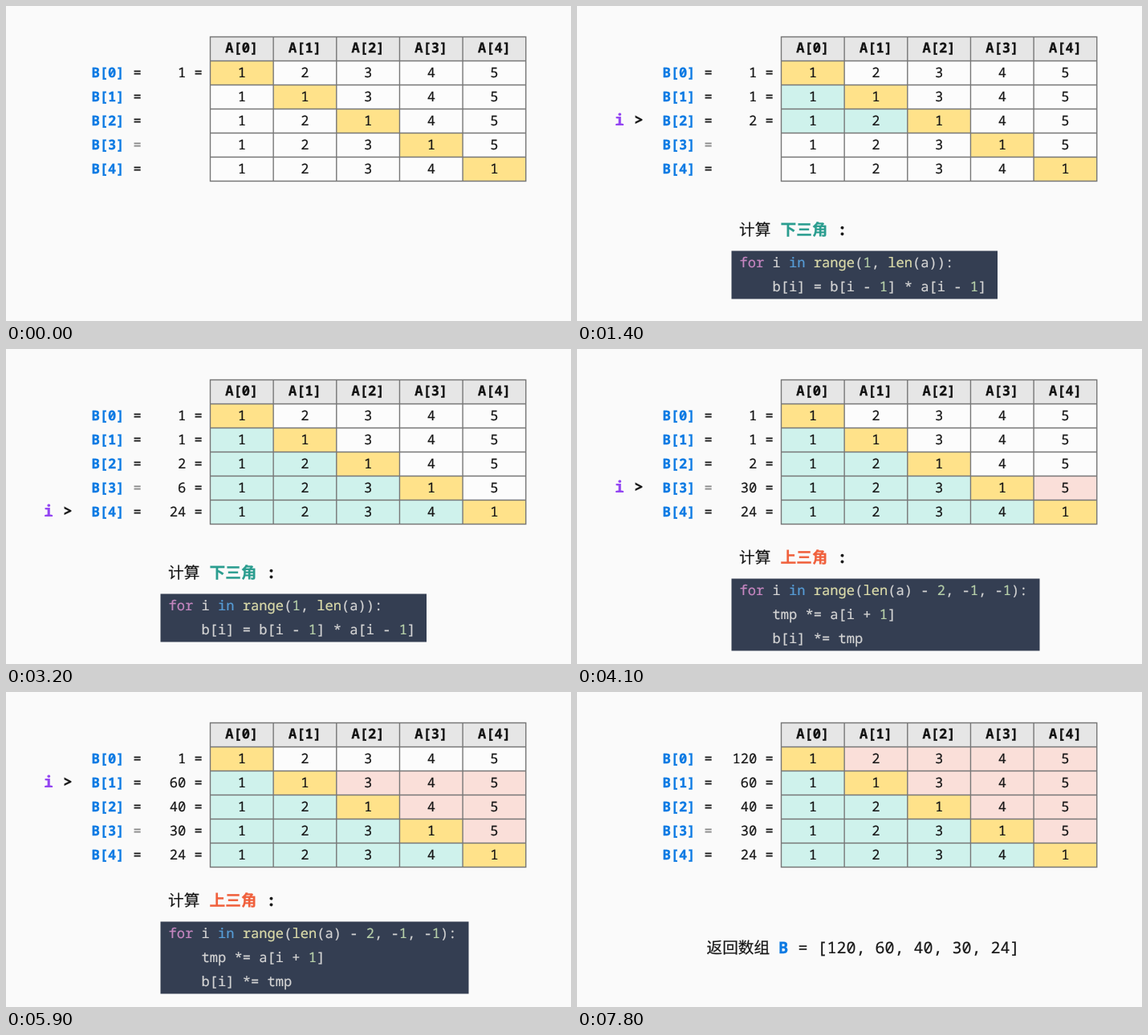
Recreate the animation shown at these times as an HTML page. Size 704 by 393 pixels, loop 8000 ms.

```html
<!DOCTYPE html>
<html lang="zh-CN">
<head>
<meta charset="utf-8">
<style>
html, body { margin: 0; width: 100%; height: 100%; overflow: hidden; background: #fafafa; }
svg { display: block; width: 100%; height: 100%; }
text { font: 500 17.1px "Noto Sans Mono", "DejaVu Sans Mono", monospace; white-space: pre; text-rendering: geometricPrecision; }
text, tspan { fill: currentColor; stroke: currentColor; stroke-width: 0.2px; }
.big { font-size: 20px; }
.cjk { font: 500 19.7px "Noto Sans CJK SC", "Noto Sans CJK", sans-serif; }
.bold { font-weight: 700; }
.heavy { font-weight: 800; stroke-width: 0.3px; }
</style>
</head>
<body>
<svg id="stage" viewBox="0 0 704 393"></svg>
<script>
const A = [1, 2, 3, 4, 5], N = A.length, LOOP = 8000;
const STEPS = [500, 1400, 2300, 3200, 4100, 5000, 5900, 6800, 7800];
const LEFT = 254.5, TOP = 38.5, COL = 78.65, ROW = 30;
const BLUE = '#0c7ae3', INK = '#161616';
const LOWER = ['for i in range(1, len(a)):', '    b[i] = b[i - 1] * a[i - 1]'];
const UPPER = ['for i in range(len(a) - 2, -1, -1):', '    tmp *= a[i + 1]', '    b[i] *= tmp'];

const product = list => list.reduce((p, v) => p * v, 1);
const rect = (x, y, w, h, fill) => `<rect x="${x}" y="${y}" width="${w}" height="${h}" fill="${fill}"/>`;
const text = (x, y, s, cls = '', color = INK, anchor = 'start') =>
  `<text x="${x}" y="${y}" class="${cls}" style="color:${color}" text-anchor="${anchor}">${s}</text>`;

const tint = word =>
  word === 'for' ? '#c586c0' :
  word === 'in' ? '#569cd6' :
  /^\d/.test(word) ? '#b5cea8' : '#dcdcaa';

const highlight = line => line.replace(/\b(for|in|range|len|\d+)\b/g,
  word => `<tspan style="color:${tint(word)}">${word}</tspan>`);

function table(low, high) {
  let out = rect(LEFT, TOP, COL * N, ROW, '#e6e6e6'), path = '';
  for (let c = 0; c < N; c++) {
    const mid = LEFT + COL * (c + 0.5);
    out += text(mid, 58.3, `A[${c}]`, 'heavy', '#111', 'middle');
    for (let r = 0; r < N; r++) {
      const y = TOP + ROW * (r + 1);
      const fill = c === r ? '#ffe28a' :
        c < r && r <= low ? '#cff2ec' :
        c > r && r >= high ? '#fadfd9' : '#fcfcfc';
      out += rect(LEFT + COL * c, y, COL, ROW, fill);
      out += text(mid, y + 20.3, c === r ? 1 : A[c], '', INK, 'middle');
    }
  }
  for (let c = 0; c <= N; c++) path += `M${LEFT + COL * c} ${TOP}v${ROW * (N + 1)}`;
  for (let r = 0; r <= N + 1; r++) path += `M${LEFT} ${TOP + ROW * r}h${COL * N}`;
  return out + `<path d="${path}" fill="none" stroke="#777" stroke-width="1.4" stroke-linecap="square"/>`;
}

function results(low, high) {
  let out = '';
  for (let r = 0; r < N; r++) {
    const y = 88.8 + ROW * r;
    const value = product(A.filter((_, c) => c < r || (c > r && r >= high)));
    out += text(106.5, y, `B[${r}]`, 'heavy', BLUE);
    out += text(158.5, y, '=', '', r === 3 ? '#888' : INK);
    if (r <= low) out += text(244.8, y, `${value} =`, '', INK, 'end');
  }
  return out;
}

function code(title, color, y, lines, width) {
  const box = y + 26.5;
  return text(202, y + 6.7, '计算', 'cjk') +
    text(253.5, y + 6.7, title, 'cjk bold', color) +
    text(324.5, y + 6.5, ':', 'big bold') +
    rect(192.5, box, width, lines.length * 30, '#343e52') +
    lines.map((s, k) => text(202.5, box + 20.3 + k * 30, highlight(s), '', '#d4d4d4')).join('');
}

function answer() {
  const list = A.map((_, r) => product(A.filter((_, c) => c !== r)));
  return text(161.5, 325.7, '返回数组', 'cjk') +
    text(251, 325.7, 'B', 'big heavy', BLUE) +
    text(275.5, 325.7, `= [${list.join(', ')}]`, 'big');
}

function scene(step) {
  const low = Math.min(step, N - 1);
  const high = step < N ? N : Math.max(0, 8 - step);
  const i = step < N ? step : 8 - step;
  let out = table(low, high) + results(low, high);
  if (step > 0 && i >= 0) {
    const y = 89 + ROW * i;
    out += text(47, y, 'i', 'big bold', '#9345f2') + text(71, y, '&gt;', 'big bold');
  }
  if (step === 0) return out;
  if (step < N) return out + code('下三角', '#2a9d8f', 279, LOWER, 331.5);
  if (i >= 0) return out + code('上三角', '#f0603c', 260, UPPER, 384);
  return out + answer();
}

const stage = document.getElementById('stage');
const start = performance.now();
let shown = -1;
function tick() {
  const t = (performance.now() - start) % LOOP;
  const step = STEPS.filter(s => s <= t).length;
  if (step !== shown) stage.innerHTML = scene(shown = step);
  requestAnimationFrame(tick);
}
tick();
</script>
</body>
</html>
```
